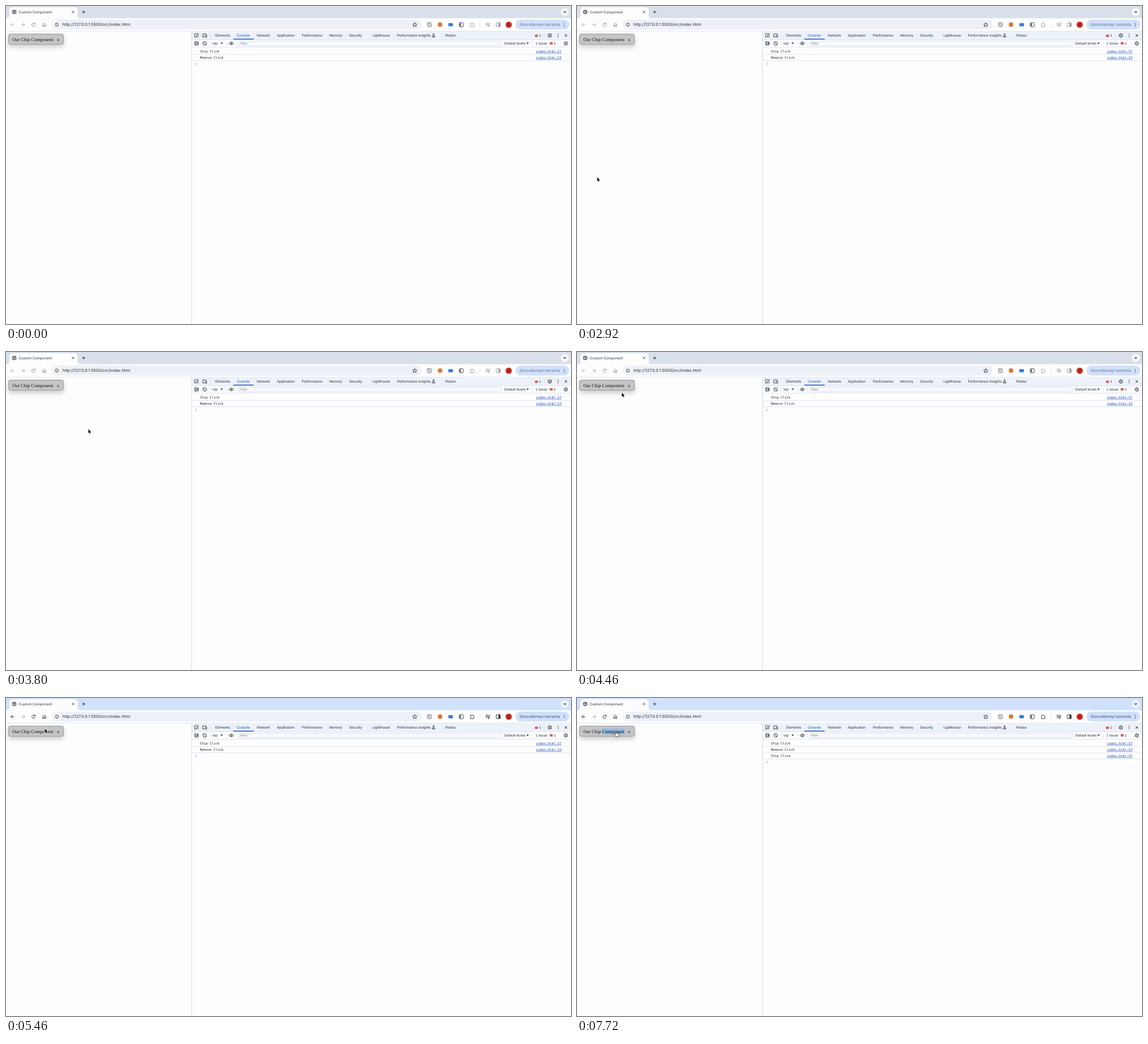
These frames come from a looping animation (998x561 px, 8000 ms). An HTML page with a canvas:

```html
<!DOCTYPE html>
<html lang="en">
<head>
<meta charset="utf-8">
<title>Custom Component</title>
<style>
html, body { margin: 0; width: 100%; height: 100%; overflow: hidden; background: #fdfdfd; }
canvas { display: block; width: 998px; height: 561px; }
</style>
</head>
<body>
<canvas id="stage" width="998" height="561"></canvas>
<script>
const ctx = document.getElementById('stage').getContext('2d');
const LOOP = 8000;
const APPEAR = 2920, FOCUS = 5300, HAND = 6160, LOG = 7000, SELECT = 7720;
const UI = '"Liberation Sans", Arial, sans-serif';
const SYS = 'Inter, Roboto, sans-serif';
const MONO = '"DejaVu Sans Mono", monospace';
const SERIF = '"Liberation Serif", serif';
const INK = '#303236', PAPER = '#fdfdfd', RULE = '#d6deee', RED = '#d33a32';

// Pointer hot spot: time, x, y
const PATH = [
  [2920, 35.5, 302], [3000, 62, 264], [3120, 118, 188], [3240, 148.5, 146.5], [3360, 148.5, 146.5],
  [3640, 147, 139], [3760, 147, 139], [3800, 145.5, 136], [3920, 145.5, 136],
  [4200, 120, 110], [4340, 98, 88], [4460, 75.5, 68.5], [4500, 75.5, 68.5],
  [5060, 68.5, 54], [6160, 68.5, 57], [6480, 58, 62], [6840, 69, 58.5]
];

function box(x, y, w, h, color) {
  ctx.fillStyle = color;
  ctx.fillRect(x, y, w, h);
}

function round(x, y, w, h, r, fill, stroke, lw = 1) {
  ctx.beginPath();
  ctx.roundRect(x, y, w, h, r);
  if (fill) { ctx.fillStyle = fill; ctx.fill(); }
  if (stroke) { ctx.strokeStyle = stroke; ctx.lineWidth = lw; ctx.stroke(); }
}

function disc(x, y, r, fill, stroke, lw = 1) {
  round(x - r, y - r, 2 * r, 2 * r, r, fill, stroke, lw);
}

function path(d, x, y, stroke, lw = 0.9, fill) {
  const p = new Path2D(d);
  ctx.save();
  ctx.translate(x, y);
  ctx.lineJoin = 'round';
  if (fill) { ctx.fillStyle = fill; ctx.fill(p); }
  if (stroke) { ctx.strokeStyle = stroke; ctx.lineWidth = lw; ctx.stroke(p); }
  ctx.restore();
}

function text(s, x, y, size, family, color = INK, weight = 400) {
  ctx.font = `${weight} ${size}px ${family}`;
  ctx.fillStyle = color;
  ctx.fillText(s, x, y);
}

function dots(x, y, color) {
  for (const k of [-1, 0, 1]) disc(x, y + k * 2.6, 0.75, color);
}

function gear(x, y) {
  ctx.strokeStyle = INK;
  ctx.lineWidth = 1.1;
  ctx.beginPath();
  for (let i = 0; i < 6; i++) {
    const a = i * Math.PI / 3 + Math.PI / 6, c = Math.cos(a), s = Math.sin(a);
    ctx.moveTo(x + c * 2.8, y + s * 2.8);
    ctx.lineTo(x + c * 4, y + s * 4);
  }
  ctx.stroke();
  disc(x, y, 2.7, null, INK, 0.9);
  disc(x, y, 0.9, INK);
}

function issue(x, y) {
  round(x - 2.4, y - 2, 4.8, 4, 0.6, RED);
  box(x - 0.4, y - 1.2, 0.8, 1.3, '#fff');
  box(x - 0.4, y + 0.5, 0.8, 0.7, '#fff');
}

const cross = (x, y, r, color) =>
  path(`M${-r} ${-r}L${r} ${r}M${r} ${-r}L${-r} ${r}`, x, y, color, 1);
const caret = (x, y) => path('M-2 -1.3H2L0 1.7Z', x, y, null, 0, INK);

function tabStrip(active) {
  box(0, 0, 998, 22, active ? '#d0e1fb' : '#d9e0e9');
  round(6, 2, 120.5, 24, 6, PAPER);
  path('M0 21.5Q6 21.5 6 15.5V21.5ZM132.5 21.5Q126.5 21.5 126.5 15.5V21.5Z', 0, 0, null, 0, PAPER);
  disc(14.5, 10.5, 3.3, '#f2f3f5', '#46494e', 1.1);
  path('M-2.8 -1.2L-0.5 -0.5L0.3 1L-0.5 2.8M0.4 -3L0.8 -1L3 0', 14.5, 10.5, '#46494e', 1.1);
  text('Custom Component', 22.8, 12.6, 6.2, SYS, '#2a2c30');
  cross(118.4, 10.5, 1.9, INK);
  path('M-2.7 0H2.7M0 -2.7V2.7', 137.2, 10.5, INK, 1);
  disc(987, 10.5, 7.2, active ? '#eaf1fe' : '#f4f6f9');
  path('M-2 -1L0 1L2 -1', 987, 10.5, INK, 1.1);
}

function toolbar(active) {
  const icon = active ? '#35383c' : '#8d9095';
  const side = active ? '#35383c' : '#9c9fa4';
  box(0, 21.5, 998, 23, PAPER);
  path('M3 0H-3M0 -3L-3 0L0 3', 11.6, 33, active ? INK : '#b3b6bb', 1);
  path('M-3 0H3M0 -3L3 0L0 3', 30.2, 33, '#a5a8ad', 1);
  path('M2.5 -1.4A2.9 2.9 0 1 0 2.8 0.8M3 -3.3V-1H0.7', 48.6, 33, icon, 1);
  path('M-2.7 3.2V-0.8L0 -3L2.7 -0.8V3.2H0.9V0.8H-0.9V3.2Z', 67.6, 33, icon, 0.9);

  round(81, 24, 653, 17.5, 8.7, '#edf0f7');
  disc(89.8, 32.8, 6.2, PAPER);
  disc(89.8, 32.8, 3.1, null, INK, 0.9);
  box(89.4, 32.4, 0.9, 2.1, INK);
  box(89.4, 31, 0.9, 0.9, INK);
  text('http://127.0.0.1:5500/src/index.html', 99.8, 35.3, 7.25, SYS, '#2a2c30');
  path('M0 -3.8L1.1 -1.2L3.8 -1L1.7 0.8L2.4 3.4L0 2L-2.4 3.4L-1.7 0.8L-3.8 -1L-1.1 -1.2Z', 722, 33, INK, 0.9);

  round(743.8, 28.8, 8.4, 8.4, 0.5, '#a9abb0');
  path('M-3.5 3.5L3.5 -3.5M-2 -2L3.4 3.2', 748, 33, '#e6e7ea', 1.3);
  disc(766.7, 32.8, 4, '#dc7830');
  round(781.4, 30.2, 8, 5.6, 1, '#3579d8');
  round(800.6, 29.4, 7, 7.2, 1, '#fff', '#4c4f54', 1);
  box(801.6, 30.4, 2, 5.2, '#4c4f54');
  path('M-3 -2.2H-1A1 1 0 0 1 1 -2.2H2.8V-0.2A1 1 0 0 1 2.8 1.8V3.5H-3V1.6A1 1 0 0 0 -3 -0.4Z', 823.3, 33, side, 0.9);
  box(836.5, 29, 1, 8, '#d7e2f5');
  path('M-3.6 -2.7H1.2M-3.6 -0.5H1.2M-3.6 1.7H-0.8M2.5 2V-2.6H4.2', 851, 33, side, 1);
  disc(852.4, 35.1, 1.3, side);
  round(866, 29.6, 7, 6.8, 0.7, null, side, 1);
  box(869.8, 29.6, 3.2, 6.8, side);
  disc(888, 33, 5.5, '#c82a1e');
  text('R', 886.2, 35, 5.4, SYS, '#4b1712');
  round(900, 24, 95, 17.5, 8.7, '#d1e1fb');
  text('Güncellemeyi tamamla', 907.2, 35.2, 6.7, SYS, active ? '#3b4f7c' : '#62708f');
  dots(986, 33, '#2d3f66');
}

function page(selected) {
  box(0, 44, 998, 1, '#e3e8f0');
  ctx.save();
  ctx.shadowColor = 'rgba(0,0,0,.2)';
  ctx.shadowBlur = 8.5;
  ctx.shadowOffsetY = 4.2;
  round(4, 49, 98, 19, 4, '#c5c5c8');
  ctx.restore();
  round(4.5, 49.5, 97, 18, 3.8, '#c5c5c8', '#95969b', 0.9);
  if (selected) box(44.6, 54, 39, 9.8, '#8dbbe9');
  text('Our Chip Component', 11.2, 61.5, 8.36, SERIF, '#111');
  text('x', 89.9, 61.5, 8.36, SERIF, '#111');
}

function devtoolsBars() {
  box(328, 45, 670, 14, '#edf1f9');
  box(328, 59, 670, 14, '#fbfcfe');
  box(328, 59, 670, 0.8, RULE);
  box(328, 72.4, 670, 0.8, RULE);
  box(327.3, 45, 1, 516, '#d2d9e8');

  path('M3.2 -0.5V-3.2H-3.2V3H-0.8M0 0L3.8 3.8M0 2.8V0H2.8', 336.5, 52, INK, 0.9);
  path('M-3.4 2.6V-2.8H3M-4 2.6H0M1 -0.8H3.6V3H1Z', 351, 52, INK, 0.9);
  box(360.3, 48, 0.8, 8, RULE);

  const tabs = { Elements: 369.5, Console: 407.4, Network: 443, Application: 478.6, Performance: 522.4,
    Memory: 571, Security: 606, Lighthouse: 647.2, 'Performance insights': 690.4, Redux: 776 };
  for (const name in tabs)
    text(name, tabs[name], 54, 6.37, UI, name === 'Console' ? '#1b57bd' : INK);
  box(401.5, 57.6, 36, 1.6, '#2160c8');
  path('M-1.3 -3H1.3M-0.8 -3V-0.6L-2.7 2.8H2.7L0.8 -0.6V-3M-1.6 1H1.6', 755.2, 52, INK, 0.8);
  issue(937, 52.4);
  text('1', 941.8, 54.4, 6.2, UI);
  box(950, 48, 0.8, 8, RULE);
  gear(960.6, 52);
  dots(975.2, 52, INK);
  cross(988.9, 52, 2.2, INK);

  round(333.2, 63, 6.4, 6, 0.6, null, INK, 0.9);
  path('M-1.3 -3V3M2 -1.5L0.3 0L2 1.5Z', 336.4, 66, INK, 0.9);
  disc(351, 66, 3.3, null, INK, 0.9);
  path('M-2.3 -2.3L2.3 2.3', 351, 66, INK, 0.9);
  for (const x of [360.3, 389.3, 407.2, 929]) box(x, 62, 0.8, 8, RULE);
  text('top', 365, 68, 6.37, UI);
  caret(381, 65.8);
  path('M-4.2 0Q0 -5 4.2 0Q0 5 -4.2 0Z', 398, 66, INK, 0.9);
  disc(398, 66, 1.2, null, INK, 0.9);
  round(411.5, 62.2, 463.5, 8.3, 1.5, '#f8f9fd', '#cfd7e8', 0.8);
  text('Filter', 413.4, 68.2, 5.9, UI, '#85888e');
  text('Default levels', 880, 68, 6.3, UI);
  caret(921.4, 65.8);
  text('1 Issue:', 935.2, 68, 6.3, UI);
  issue(963, 65.8);
  text('1', 967.8, 68, 6.2, UI);
  gear(988.8, 66);
}

function consoleLog(rows) {
  rows.forEach(([msg, line], i) => {
    const y = 82 + i * 11, link = 'index.html:' + line;
    text(msg, 342.4, y, 5.76, MONO, '#222');
    text(link, 936.1, y, 5.76, MONO, '#2451b5');
    box(936.1, y + 0.7, 45, 0.7, '#2451b5');
    box(328, y + 3, 670, 0.8, '#d9e2f3');
  });
  path('M-1.1 -1.9L0.9 0L-1.1 1.9', 335.6, 80.2 + rows.length * 11, '#7c8aa8', 0.9);
}

function pointerAt(t) {
  const i = PATH.findIndex(p => p[0] > t);
  if (i < 0) return PATH[PATH.length - 1].slice(1);
  const [a, x0, y0] = PATH[i - 1], [b, x1, y1] = PATH[i];
  const k = (t - a) / (b - a);
  return [x0 + (x1 - x0) * k, y0 + (y1 - y0) * k];
}

function pointer(t) {
  if (t < APPEAR) return;
  const [x, y] = pointerAt(t > 5060 && t < HAND ? 5060 : t);
  if (t < HAND) {
    path('M0 0V7.2L1.6 5.7L2.7 8.3L4 7.8L2.9 5.2H5.1Z', x, y, '#fff', 1.1, '#111');
    path('M0 0V7.2L1.6 5.7L2.7 8.3L4 7.8L2.9 5.2H5.1Z', x, y, null, 0, '#111');
  } else {
    path('M-0.9 0.4Q0 -0.8 0.9 0.4V3.2Q2 2.6 2.5 3.5Q3.6 3 4 4Q5.2 3.6 5.2 5V6.8L4.2 9.6H-0.8L-3.2 5.8Q-3.2 4.4 -1.9 5L-0.9 6Z',
      x, y, '#222', 0.8, '#fff');
    path('M0.9 3.2V5.4M2.5 3.6V5.4M4 4.1V5.6', x, y, '#333', 0.5);
  }
}

function draw(t) {
  const active = t >= FOCUS;
  ctx.textRendering = 'geometricPrecision';
  box(0, 0, 998, 561, PAPER);
  tabStrip(active);
  toolbar(active);
  page(t >= SELECT);
  devtoolsBars();
  const rows = [['Chip Click', 57], ['Remove Click', 53]];
  if (t >= LOG) rows.push(['Chip Click', 57]);
  consoleLog(rows);
  pointer(t);
}

const start = performance.now();
function tick() {
  const t = (performance.now() - start) % LOOP;
  draw(Math.floor(t / 40) * 40);
  requestAnimationFrame(tick);
}
tick();
</script>
</body>
</html>
```
